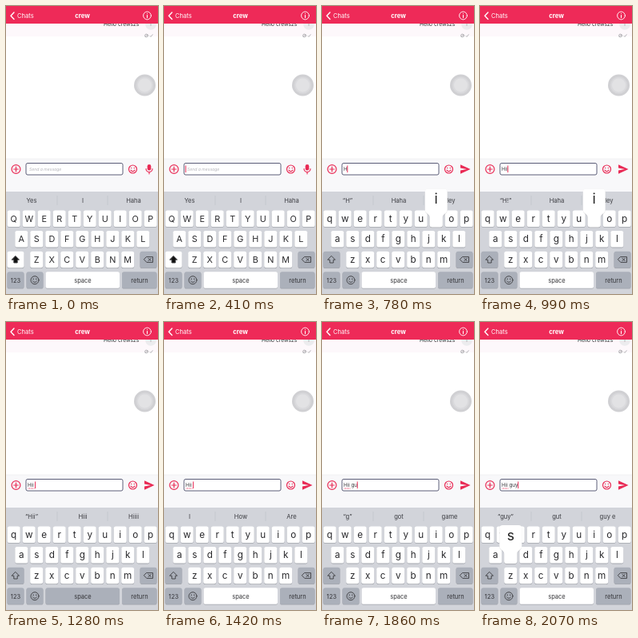
Write an HTML page that moves like this. It is 190 px wide and 360 px high and loops after 2.14 s.

```html
<!DOCTYPE html>
<html lang="en">
<head>
<meta charset="utf-8">
<title>Typing a chat message</title>
<style>
  html, body { margin: 0; width: 100%; height: 100%; overflow: hidden; background: #fff; }
  svg { display: block; width: 190px; height: 360px; font-family: Inter, Roboto, "Liberation Sans", sans-serif; }
  text { white-space: pre; }
  .mid { text-anchor: middle; }
  .line { fill: none; stroke-linecap: round; stroke-linejoin: round; }
  .pink { stroke: #e92a55; stroke-width: 1.2; }
  .dark { stroke: #3a3a3e; stroke-width: .9; }
</style>
</head>
<body>
<svg id="stage" viewBox="0 0 190 360">
  <defs>
    <filter id="soft" x="-30%" y="-20%" width="160%" height="150%">
      <feDropShadow dx="0" dy=".5" stdDeviation=".7" flood-color="#666" flood-opacity=".35"/>
    </filter>
    <g id="smile" class="line">
      <circle r="5"/>
      <path d="M-2.5 1.2Q0 4.4 2.5 1.2"/>
      <path d="M-1.8 -1.6v.2M1.8 -1.6v.2" stroke-width="1.4"/>
    </g>
  </defs>

  <rect width="190" height="360" fill="#fff"/>

  <!-- conversation -->
  <rect y="22" width="190" height="16" fill="#fdf8fb"/>
  <text x="122" y="25" font-size="6.7" fill="#2b2b2e">Hello crewszs</text>
  <circle cx="181" cy="23" r="6.8" fill="#ececee"/>
  <path d="M181 21.5v3.5" stroke="#b9b9bd" stroke-width="1"/>
  <g class="line" stroke="#98989d" stroke-width=".7">
    <circle cx="175.5" cy="37" r="1.9"/>
    <path d="M174.3 38.2l2.4-2.4M180 37.5l1 1 2.2-2.8"/>
  </g>
  <circle cx="173.5" cy="99" r="13.5" fill="#d0d0d3"/>
  <circle cx="173.5" cy="99" r="10.5" fill="#d9d9dc"/>
  <circle cx="173.5" cy="99" r="8.5" fill="#e2e2e4"/>

  <!-- header -->
  <rect width="190" height="22" fill="#ee2a58"/>
  <path class="line" d="M10 8L6 12.2L10 16.4" stroke="#fff" stroke-width="1.4"/>
  <text x="14" y="15" font-size="7.6" fill="#fff">Chats</text>
  <text class="mid" x="95.5" y="15" font-size="7.8" font-weight="700" fill="#fff">crew</text>
  <g class="line" stroke="#fff">
    <circle cx="176.5" cy="12" r="4.9" stroke-width=".9"/>
    <path d="M176.5 11.6v2.8M176.5 9.5v.1" stroke-width="1.1"/>
  </g>

  <!-- message bar -->
  <rect y="191" width="190" height="41" fill="#f8f8fa"/>
  <path d="M0 191h190" stroke="#efeff2" stroke-width=".8"/>
  <g class="line pink">
    <circle cx="12.5" cy="204" r="5.4"/>
    <path d="M9.7 204h5.6M12.5 201.2v5.6"/>
  </g>
  <rect x="25" y="196.5" width="121" height="14.5" rx="2" fill="#fff" stroke="#5c5e78"/>
  <text id="hint" x="29" y="206" font-size="5.1" font-style="italic" fill="#b4b4ba">Send a message</text>
  <text id="draft" x="27" y="206.3" font-size="6.3" fill="#333338"></text>
  <path id="wavy" d="M27.5 208h8" stroke="#e92a55" stroke-width=".8" stroke-dasharray="1 .5"/>
  <rect id="caret" y="199.5" width="1" height="8.6" fill="#e92a55"/>
  <use href="#smile" x="158.5" y="204" class="pink"/>
  <g id="mic">
    <rect x="176.7" y="198" width="4.6" height="7.6" rx="2.3" fill="#e92a55"/>
    <path class="line pink" d="M175 203.5a4 4 0 0 0 8 0M179 207.6v2.2"/>
  </g>
  <path id="send" d="M173 198.2L185.5 204L173 209.8V205.4L181 204L173 202.6Z" fill="#e92a55"/>

  <!-- keyboard -->
  <rect y="232" width="190" height="128" fill="#d2d4da"/>
  <path d="M64 237v12M127 237v12" stroke="#c0c3c9" stroke-width=".7"/>
  <g id="bar" class="mid" font-size="7.6" fill="#3c3d42">
    <text x="32" y="246"></text><text x="96" y="246"></text><text x="159.5" y="246"></text>
  </g>
  <g id="keys"></g>
  <path id="shift" class="line dark" d="M12 312.6L16.5 317.2H14.2V321H9.8V317.2H7.5Z"/>
  <path class="line dark" d="M175.8 313.6H183.5V320.4H175.8L172.6 317ZM178 315.4l3.2 3.2M181.2 315.4l-3.2 3.2"/>
  <use href="#smile" x="36" y="342.7" class="dark"/>
  <g class="mid" fill="#333337" font-size="7.5">
    <text x="12" y="345.5">123</text>
    <text x="96" y="345.5">space</text>
    <text x="167" y="345.5">return</text>
  </g>
  <g id="popup" filter="url(#soft)">
    <path d="M-14 -23Q-14 -27 -10 -27H10Q14 -27 14 -23V-1C14 4 8 4 8 9V18Q8 21 5 21H-5Q-8 21 -8 18V9C-8 4 -14 4 -14 -1Z" fill="#fff"/>
    <text class="mid" y="-8.6" font-size="17.5" fill="#222"></text>
  </g>
</svg>

<script>
const LOOP = 2140;
const NS = 'http://www.w3.org/2000/svg';
const $ = id => document.getElementById(id);
const ROWS = ['qwertyuiop', 'asdfghjkl', 'zxcvbnm'];
const FIRST_X = [9.7, 19.3, 38.2];
const rowTop = r => 255.5 + r * 25.6;

// Each track lists [start time, value]; a value holds until the next one.
const DRAFT = [[0, ''], [560, 'H'], [840, 'Hi'], [990, 'Hii'], [1280, 'Hii '],
  [1640, 'Hii g'], [1850, 'Hii gu'], [1990, 'Hii guy']];
const PRESSED = [[0, ''], [490, 'H'], [630, ''], [770, 'i'], [840, ''], [920, 'i'],
  [1060, ''], [1280, ' '], [1350, ''], [1570, 'g'], [1710, ''], [1780, 'u'],
  [1850, ''], [1920, 'y'], [1990, ''], [2060, 's']];
const WORDS = [[0, 'Yes|I|Haha'], [630, 'Ye|H|Hah'], [700, '“H”|Haha|Hey'],
  [990, '“H!”|Haha|Hey'], [1060, '“Hii”|Hiii|Hiiii'], [1350, 'I|How|Are'],
  [1710, '“g|got|gam'], [1780, '“g”|got|game'], [1920, '“gu”|guys|guy'],
  [2070, '“guy”|gut|guy e']];

const at = (track, t) => track.findLast(step => step[0] <= t)[1];

function add(name, attrs) {
  const el = document.createElementNS(NS, name);
  for (const k in attrs) el.setAttribute(k, attrs[k]);
  return $('keys').appendChild(el);
}

function addKey(x, y, width, fill) {
  const box = { x, width, height: 20.5, rx: 2.6 };
  add('rect', { ...box, y: y + .8, fill: '#a3a6ad' });
  return add('rect', { ...box, y, fill });
}

const spots = {};
const caps = [];
ROWS.forEach((row, r) => [...row].forEach((ch, i) => {
  const x = FIRST_X[r] + i * 19, y = rowTop(r);
  addKey(x - 8, y, 16, '#fff');
  spots[ch] = [x, y];
  const label = add('text', { x, y: y + 14.2, class: 'mid', fill: '#29292c' });
  caps.push([label, ch]);
}));
const GREY = '#abb0ba';
const shiftKey = addKey(1.5, rowTop(2), 21, GREY);
addKey(167.5, rowTop(2), 21, GREY);
addKey(1.5, rowTop(3), 21, GREY);
addKey(25.5, rowTop(3), 21, GREY);
const spaceKey = addKey(49.5, rowTop(3), 92.5, '#fff');
addKey(145, rowTop(3), 43.5, GREY);

const show = (el, on) => el.setAttribute('visibility', on ? 'visible' : 'hidden');

let lastUpper;
function setCase(upper) {
  if (upper === lastUpper) return;
  lastUpper = upper;
  for (const [label, ch] of caps) {
    label.textContent = upper ? ch.toUpperCase() : ch;
    label.setAttribute('font-size', upper ? 10.8 : 11.7);
  }
  shiftKey.setAttribute('fill', upper ? '#fff' : GREY);
  $('shift').style.fill = upper ? '#111' : 'none';
}

function draw(t) {
  const text = at(DRAFT, t), key = at(PRESSED, t), typed = text !== '';
  setCase(t < 630);

  $('draft').textContent = text;
  show($('hint'), !typed);
  show($('mic'), !typed);
  show($('send'), typed);
  show($('wavy'), t >= 1060);
  $('caret').setAttribute('x', 26.6 + (typed ? $('draft').getComputedTextLength() : 0));
  $('caret').setAttribute('opacity', Math.min(1, Math.max(0, (t - 140) / 210)));

  const words = at(WORDS, t).split('|');
  [...$('bar').children].forEach((el, i) => el.textContent = words[i]);

  spaceKey.setAttribute('fill', key === ' ' ? GREY : '#fff');
  const spot = spots[key.toLowerCase()];
  show($('popup'), !!spot);
  if (spot) {
    $('popup').setAttribute('transform', `translate(${spot})`);
    $('popup').lastElementChild.textContent = key;
  }
}

const start = performance.now();
function tick() {
  draw((performance.now() - start) % LOOP);
  requestAnimationFrame(tick);
}
tick();
</script>
</body>
</html>
```
